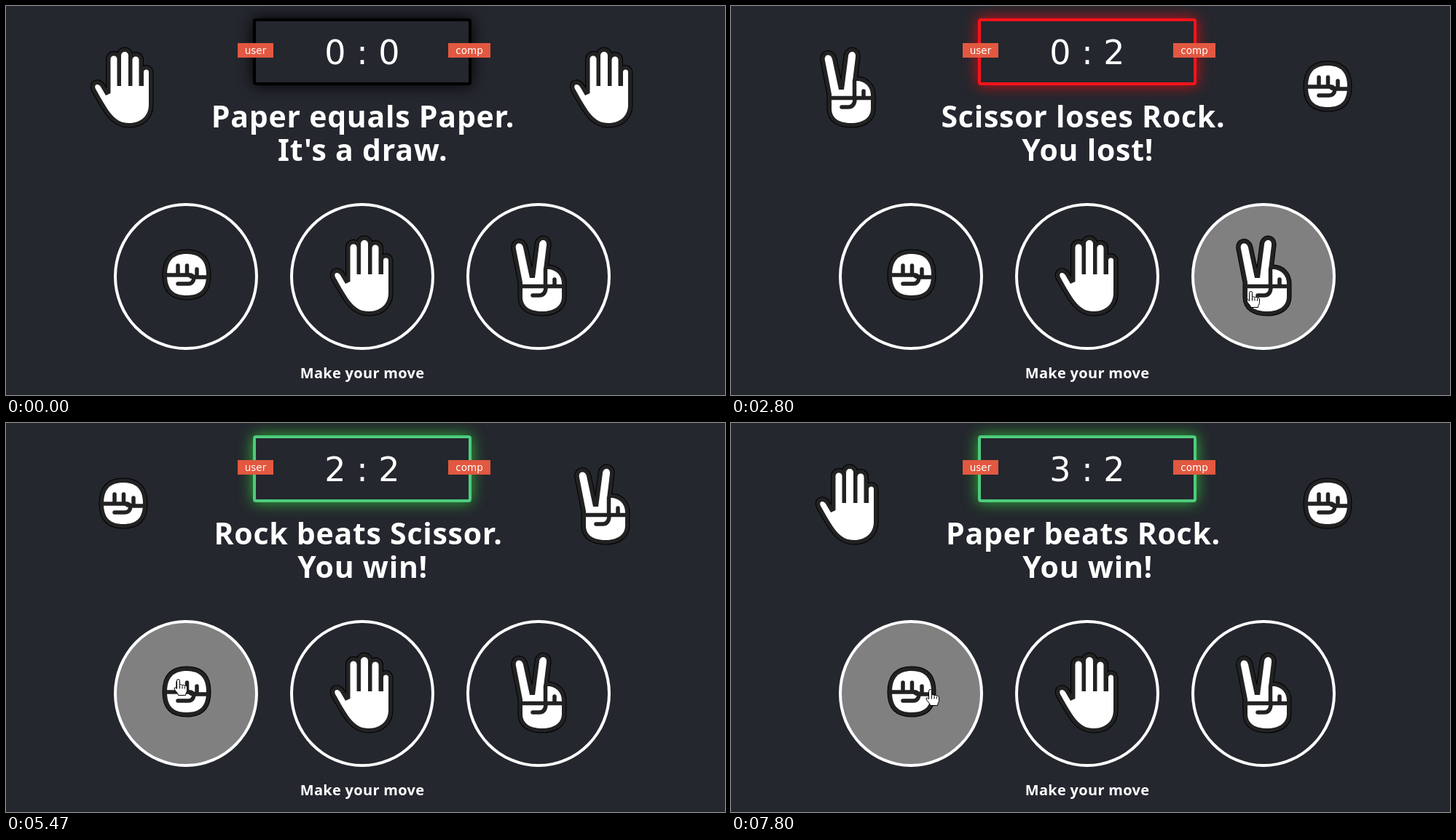
These frames come from a looping animation (987 by 535 pixels, 8000 ms). An HTML page:

```html
<!DOCTYPE html>
<html lang="en">
<head>
<meta charset="utf-8">
<title>Rock Paper Scissor</title>
<style>
  html, body { margin: 0; height: 100%; overflow: hidden; background: #24272e; }
  div, svg { position: absolute; box-sizing: border-box; }
  svg { left: 0; top: 0; }
  #board { left: 339px; top: 17px; width: 300px; height: 92px; border: 4px solid; border-radius: 4px; }
  .choice { top: 271px; width: 198px; height: 202px; border: 4px solid #fff; border-radius: 50%; }
  text { fill: #fff; text-anchor: middle; font: bold 41px "Noto Sans", "Open Sans", sans-serif; letter-spacing: .75px; }
  #score { font: 46px "DejaVu Sans", sans-serif; letter-spacing: 0; }
  .badge { font: 13.5px "DejaVu Sans", sans-serif; letter-spacing: 0; }
  #prompt { font-size: 20px; letter-spacing: .3px; }
  .edge { fill: #000; stroke: #000; stroke-width: 13; stroke-linejoin: round; }
  .rim { fill: #222; stroke: #222; stroke-width: 11; stroke-linejoin: round; }
  .crease { fill: none; stroke: #222; stroke-width: 5.5; stroke-linecap: round; stroke-linejoin: round; }
  .cursor { fill: #fff; stroke: #000; }
</style>
</head>
<body>
<div id="board"></div>
<div class="choice" style="left:148px"></div>
<div class="choice" style="left:390px"></div>
<div class="choice" style="left:632px"></div>
<svg width="987" height="535">
  <defs>
    <path id="rockShape" d="M248 341C266 341 275 350 275 370S266 398 248 398S221 390 221 370S230 341 248 341Z"/>
    <path id="paperShape" d="M472.5 332a4.5 4.5 0 0 1 9 0V369H487V327a5 5 0 0 1 10 0V369H502.5V333a4.5 4.5 0 0 1 9 0V369H518V350a3.5 3.5 0 0 1 7 0V395C525 410 514 420 498 420C478 420 470 405 452 373C449 366 456 365 459 370L466 382L472.5 379Z"/>
    <path id="scissorShape" d="M700 334C698 325 708 324 710 332L719 374H726L732 328C733 320 743 320 742 329L738 362H743C755 362 763 370 763 382V400C763 413 752 420 736 420C720 420 709 414 709 400V380Z"/>
    <g id="rock">
      <use href="#rockShape" class="edge"/><use href="#rockShape" class="rim"/><use href="#rockShape" fill="#fff"/>
      <path class="crease" d="M221 370H254L259 373H275M236 357V370M248.5 357V368L254 372M262 362V372M236 382H250Q257 382 258 374"/>
    </g>
    <g id="paper">
      <use href="#paperShape" class="edge"/><use href="#paperShape" class="rim"/><use href="#paperShape" fill="#fff"/>
    </g>
    <g id="scissor">
      <use href="#scissorShape" class="edge"/><use href="#scissorShape" class="rim"/><use href="#scissorShape" fill="#fff"/>
      <path class="crease" d="M709 385.5H763M740.5 362V385M753 376V385M723 398H732Q740 398 741 388"/>
    </g>
  </defs>
  <use href="#rock"/><use href="#paper"/><use href="#scissor"/>
  <use id="user"/><use id="comp"/>
  <path fill="#e25840" d="M318 51h49v20h-49zM607 51h58v20h-58z"/>
  <text class="badge" x="342.5" y="66">user</text>
  <text class="badge" x="636" y="66">comp</text>
  <text id="score" x="489" y="80"></text>
  <text id="line1" y="167"></text>
  <text id="line2" x="489.7" y="213"></text>
  <text id="prompt" x="489" y="512">Make your move</text>
  <path id="arrow" class="cursor" d="M0 0V17l4-4 2.5 6 3-1.2L7 12h5z"/>
  <path id="hand" class="cursor" d="M-2 13V2a2 2 0 0 1 4 0v6a2 2 0 0 1 3.5.5a2 2 0 0 1 3.5.7a2 2 0 0 1 3 1.3V15c0 3-2 4-2 7H0c0-3-5-6-5.5-9.5c0-1.5 2-1.5 3.5.5zM2 8v5M5.5 9v4M9 10v3"/>
</svg>
<script>
const LOOP = 8000, FADE = 300, CLICK_LEAD = 52;
const $ = id => document.getElementById(id);
const buttons = document.querySelectorAll('.choice');
const hands = ['rock', 'paper', 'scissor'];
const names = ['Rock', 'Paper', 'Scissor'];
const ROCK = 0, PAPER = 1, SCISSOR = 2;

const results = {
  draw: { verb: 'equals', text: "It's a draw.", x: 490, border: '#000', glow: '#000' },
  lose: { verb: 'loses', text: 'You lost!', x: 483.5, border: '#fc121b', glow: '#d01115' },
  win: { verb: 'beats', text: 'You win!', x: 483.5, border: '#4dcc7d', glow: '#31b43a' }
};
// [time, user, comp, result, score]
const rounds = [
  [-2000, PAPER, PAPER, 'draw', '0 : 0'],
  [1070, PAPER, SCISSOR, 'lose', '0 : 1'],
  [2200, SCISSOR, ROCK, 'lose', '0 : 2'],
  [3400, SCISSOR, PAPER, 'win', '1 : 2'],
  [4730, ROCK, SCISSOR, 'win', '2 : 2'],
  [6070, ROCK, ROCK, 'draw', '2 : 2'],
  [7130, PAPER, ROCK, 'win', '3 : 2']
];
// [button, enter, leave]
const hovers = [
  [PAPER, 310, 1390], [SCISSOR, 1425, 3765], [PAPER, 3810, 3940],
  [ROCK, 3965, 6350], [PAPER, 6395, 7300], [ROCK, 7360, 9000]
];
// [time, x, y] of the pointer tip
const path = [
  [130, 972, 528], [230, 730, 482], [310, 584, 425], [460, 520, 396],
  [1130, 520, 396], [1400, 614, 389], [1600, 713, 392],
  [3560, 713, 392], [3765, 632, 388], [3930, 400, 368], [4130, 242, 353],
  [4930, 242, 353], [5300, 236, 352], [5670, 236, 352], [5800, 241, 352],
  [6090, 241, 352], [6270, 282, 359], [6350, 345, 372], [6560, 470, 392],
  [7160, 470, 392], [7300, 392, 385], [7400, 320, 375], [7600, 273, 366], [LOOP, 273, 366]
];

// CSS "ease", cubic-bezier(.25, .1, .25, 1)
function ease(p) {
  if (p <= 0) return 0;
  if (p >= 1) return 1;
  let lo = 0, hi = 1, s = .5;
  for (let i = 0; i < 18; i++) {
    if (.75 * s * (1 - s) + s ** 3 < p) lo = s; else hi = s;
    s = (lo + hi) / 2;
  }
  return .3 * s * (1 - s) ** 2 + 3 * s * s * (1 - s) + s ** 3;
}
const pulse = (t, on, off) => ease((t - on) / FADE) - ease((t - off) / FADE);
const mix = (a, amount, b) => `color-mix(in srgb, ${a} ${amount * 100}%, ${b})`;

// Moves a hand from its button to the place beside the board
function placeHand(id, kind, center) {
  $(id).setAttribute('href', '#' + hands[kind]);
  $(id).setAttribute('transform', `translate(${center - 248 - 242 * kind} -259)`);
}

function drawPointer(t) {
  const over = hovers.some(([, on, off]) => t >= on && t < off);
  const next = Math.max(1, path.findIndex(k => k[0] > t));
  const [t0, x0, y0] = path[next - 1], [t1, x1, y1] = path[next];
  const p = (t - t0) / (t1 - t0);
  const x = Math.round(x0 + (x1 - x0) * p), y = Math.round(y0 + (y1 - y0) * p);
  for (const id of ['arrow', 'hand']) {
    const shown = t >= path[0][0] && (id === 'hand') === over;
    $(id).setAttribute('visibility', shown ? 'visible' : 'hidden');
    $(id).setAttribute('transform', `translate(${x + .5} ${y + .5})`);
  }
}

function draw(t) {
  const [time, user, comp, outcome, score] = rounds.findLast(r => r[0] <= t);
  const result = results[outcome];
  placeHand('user', user, 161);
  placeHand('comp', comp, 819);
  $('score').textContent = score;
  $('line1').textContent = `${names[user]} ${result.verb} ${names[comp]}.`;
  $('line1').setAttribute('x', result.x);
  $('line2').textContent = result.text;
  $('board').style.borderColor = result.border;
  $('board').style.boxShadow = `0 0 20px ${result.glow}`;

  const click = time - CLICK_LEAD;
  buttons.forEach((button, i) => {
    const gray = hovers.reduce((sum, [b, on, off]) => b === i ? sum + pulse(t, on, off) : sum, 0);
    const glow = i === user ? pulse(t, click, click + FADE) : 0;
    button.style.background = `rgba(128, 128, 128, ${Math.min(1, gray)})`;
    button.style.borderColor = mix(result.border, glow, '#fff');
    button.style.boxShadow = `0 0 ${20 * glow}px ${mix(result.glow, glow, 'transparent')}`;
  });
  drawPointer(t);
}

const start = performance.now();
function tick() {
  draw((performance.now() - start) % LOOP);
  requestAnimationFrame(tick);
}
tick();
</script>
</body>
</html>
```
